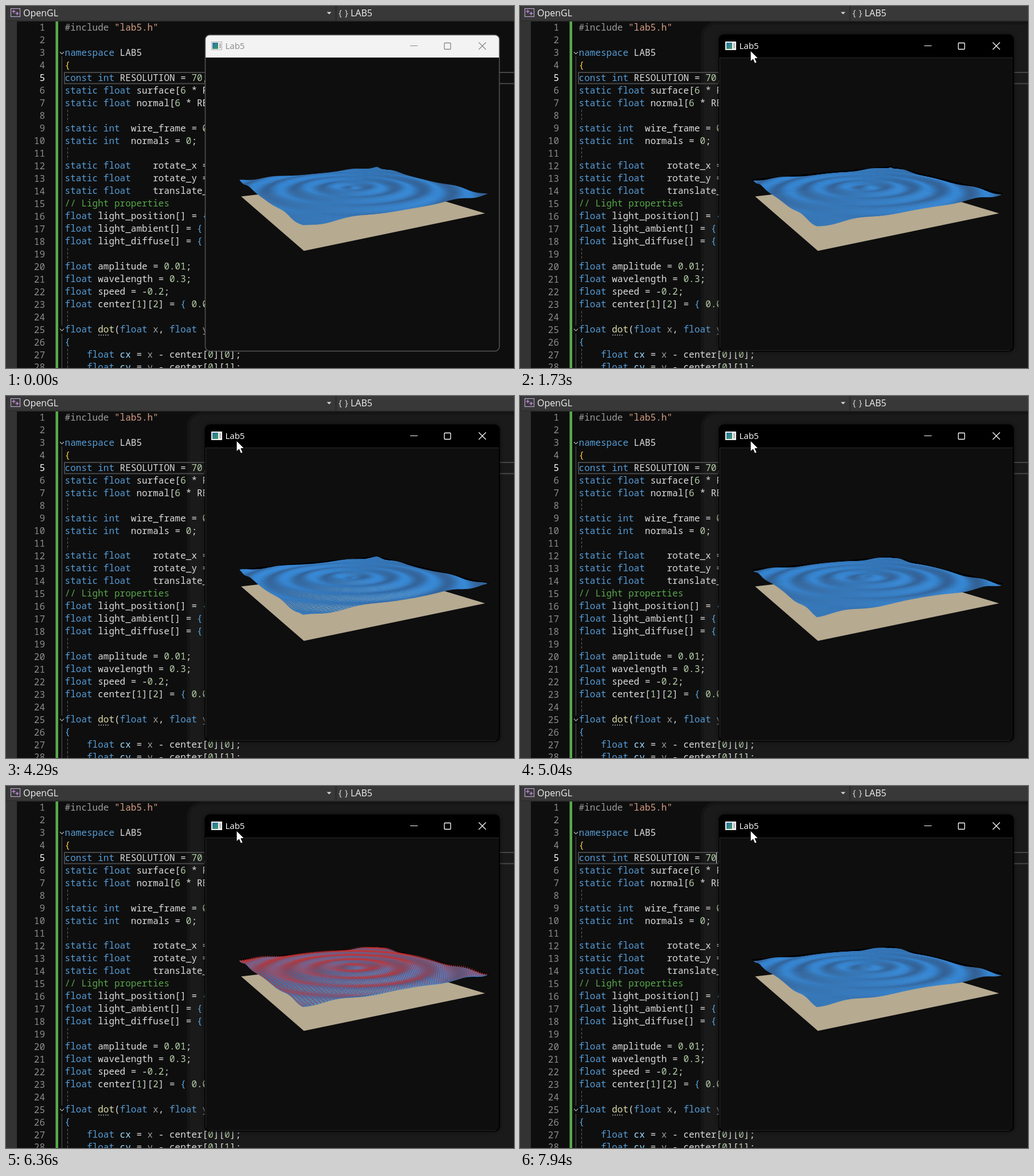
Animation, 886 px wide and 632 px high, one loop 8000 ms. Source, as an HTML page with a canvas:

```html
<!DOCTYPE html>
<html lang="en">
<head>
<meta charset="utf-8">
<title>Water surface</title>
<style>
  html, body { margin: 0; width: 100%; height: 100%; overflow: hidden; background: #0e0e0e; }
  canvas { display: block; }
</style>
</head>
<body>
<canvas id="stage" width="886" height="632"></canvas>
<script>
const ctx = document.getElementById('stage').getContext('2d');
const LOOP = 8000, ACTIVATE = 100;
const MONO = '500 16px "Noto Sans Mono", "DejaVu Sans Mono", monospace';
const UI = '"Open Sans", "Noto Sans", sans-serif';
const CHAR = 9.6, PITCH = 21.97, CODE_X = 102.6;
const lineY = n => 37.3 + (n - 1) * PITCH;

// ---------- drawing helpers ----------
function rect(x, y, w, h, color) {
  ctx.fillStyle = color;
  ctx.fillRect(x, y, w, h);
}
function round(x, y, w, h, r) {
  ctx.beginPath();
  ctx.roundRect(x, y, w, h, r);
}
function path(points, close) {
  ctx.beginPath();
  points.forEach(([x, y]) => ctx.lineTo(x, y));
  if (close) ctx.closePath();
}
function line(points, color, width = 1) {
  path(points);
  ctx.strokeStyle = color;
  ctx.lineWidth = width;
  ctx.stroke();
}
function text(str, x, y, color, font, align = 'left') {
  ctx.font = font;
  ctx.textAlign = align;
  ctx.fillStyle = color;
  ctx.fillText(str, x, y);
}

// ---------- editor ----------
const code = `#include "lab5.h"

namespace LAB5
{
const int RESOLUTION = 70;
static float surface[6 * RES
static float normal[6 * RES

static int  wire_frame = 0;
static int  normals = 0;

static float    rotate_x = 
static float    rotate_y = 
static float    translate_z
// Light properties
float light_position[] = {
float light_ambient[] = {
float light_diffuse[] = {

float amplitude = 0.01;
float wavelength = 0.3;
float speed = -0.2;
float center[1][2] = { 0.0

float dot(float x, float y
{
    float cx = x - center[0][0];
    float cy = y - center[0][1];`.split('\n');

const TOKEN = /(\/\/.*)|("[^"]*")|(#\w+)|\b(namespace|const|int|static|float)\b|\b(\d[\d.]*)|([{}])|\b(c[xy])\b|\b([xy])\b|\b(dot)\b|\w+|\s+|./g;
const TOKEN_COLORS = ['#57a64a', '#d69d85', '#9b9b9b', '#569cd6', '#b5cea8', '#5aa9e6', '#9cdcfe', '#9a9a9a', '#dcdcaa'];

function drawCodeLine(str, n) {
  for (const m of str.matchAll(TOKEN)) {
    const kind = m.slice(1).findIndex(Boolean);
    const color = n === 4 ? '#ffc83d' : TOKEN_COLORS[kind] || '#dcdcdc';
    text(m[0], CODE_X + m.index * CHAR, lineY(n) + 5.5, color, MONO);
  }
}

function drawTopBar() {
  rect(0, 0, 886, 27, '#2e2e2e');
  rect(2, 0, 572, 25, '#383838');
  rect(577, 0, 309, 25, '#383838');
  ctx.strokeStyle = '#b9a3c9';
  ctx.lineWidth = 1.2;
  ctx.strokeRect(8.5, 4.5, 16, 14);
  for (const [x, y] of [[13.5, 9.5], [19.5, 13]]) {
    line([[x - 3, y], [x + 3, y]], '#c68be0', 1.4);
    line([[x, y - 3], [x, y + 3]], '#c68be0', 1.4);
  }
  text('OpenGL', 30, 18, '#f0f0f0', '16px ' + UI);
  text('{', 580, 17, '#e0e0e0', '15px ' + UI);
  text('}', 591, 17, '#e0e0e0', '15px ' + UI);
  text('LAB5', 601, 18, '#f0f0f0', '16px ' + UI);
  path([[559.5, 10.5], [567.5, 10.5], [563.5, 14.5]], true);
  ctx.fillStyle = '#d8d8d8';
  ctx.fill();
}

function drawEditor(active, caret) {
  rect(0, 0, 886, 632, '#0e0e0e');
  if (active) {
    round(318, 30, 600, 640, 24);
    ctx.fillStyle = '#1a1a1a';
    ctx.fill();
    ctx.strokeStyle = '#151515';
    ctx.lineWidth = 5;
    ctx.stroke();
  }
  drawTopBar();
  rect(0, 27, 19, 605, '#333');
  rect(86.5, 27, 4.5, 605, '#58ab4b');
  ctx.strokeStyle = '#464646';
  ctx.lineWidth = 2;
  ctx.strokeRect(102, 116, 800, 19.5);

  line([[97.5, 88], [97.5, 558]], '#555');
  line([[97.5, 572], [97.5, 632]], '#555');
  for (const n of [3, 25]) {
    const y = lineY(n);
    line([[94, y - 1], [97.5, y + 2.5], [101, y - 1]], '#b0b0b0', 1.2);
  }
  ctx.setLineDash([4, 3]);
  for (const n of [8, 11, 19, 24, 27, 28])
    line([[107.5, lineY(n) - 10], [107.5, lineY(n) + 12]], '#666');
  ctx.setLineDash([2, 2]);
  line([[161, 574.5], [179, 574.5]], '#aaa', 1.5);
  ctx.setLineDash([]);

  code.forEach((str, i) => {
    const n = i + 1;
    text(n, 68, lineY(n) + 6, n === 5 ? '#fff' : '#8c8c8c', MONO, 'right');
    drawCodeLine(str, n);
  });
  if (caret) rect(342, 116, 1.2, 19, '#dcdcdc');
}

// ---------- window ----------
function drawWindow(active) {
  ctx.save();
  if (active) {
    ctx.shadowColor = 'rgba(0,0,0,.6)';
    ctx.shadowBlur = 10;
  }
  round(347.5, 50.5, 513, 552, 8);
  ctx.fillStyle = '#0e0e0e';
  ctx.fill();
  ctx.restore();

  ctx.save();
  ctx.clip();
  rect(347, 50, 514, 40, active ? '#000' : '#f3f3f3');
  if (active) rect(347, 90, 514, 1, '#2a2a2a');
  ctx.restore();
  ctx.strokeStyle = active ? '#000' : '#555';
  ctx.lineWidth = active ? 2 : 1.5;
  ctx.stroke();
  if (active) {
    line([[348.5, 90], [348.5, 596]], '#2a2a2a');
    line([[354, 601.5], [854, 601.5]], '#2a2a2a');
  }

  const ink = active ? '#fff' : '#8a8a8a';
  rect(358, 62, 19, 15, active ? '#e8e8e8' : '#b5b5b5');
  rect(359, 63, 17, 13, '#f4f4f4');
  const blend = ctx.createLinearGradient(360, 64, 370, 75);
  blend.addColorStop(0, '#2d6fb0');
  blend.addColorStop(1, '#3c9a62');
  rect(360, 64, 10, 11, blend);
  rect(372, 65, 3, 9, '#b8b8b8');
  text('Lab5', 382.5, 75, ink, '15px ' + UI);
  line([[705, 69.5], [718, 69.5]], ink);
  ctx.lineWidth = 1.3;
  round(764.5, 64.5, 11, 11, 1);
  ctx.stroke();
  line([[824.5, 63.5], [837, 76]], ink, 1.2);
  line([[837, 63.5], [824.5, 76]], ink, 1.2);
}

function drawPointer() {
  path([[402, 78], [402, 97], [406.4, 93], [409.5, 100.2], [413, 98.7], [409.8, 91.7], [415.5, 91.5]], true);
  ctx.fillStyle = '#fff';
  ctx.fill();
  ctx.strokeStyle = '#000';
  ctx.lineWidth = 1;
  ctx.stroke();
}

// ---------- water ----------
const RESOLUTION = 70, AMPLITUDE = 0.01, WAVELENGTH = 0.3, SPEED = -0.2;
const LEVEL = 0.2, PHASE = 0.406, NORMAL_LENGTH = 0.02;
const FREQ = 2 * Math.PI / WAVELENGTH;
const LIGHT = { x: 1, z: 1 };
const FOCAL = 256 / Math.tan(Math.PI / 8);
const YAW = Math.PI / 6, PITCH_ANGLE = Math.PI / 12;
const [cosYaw, sinYaw] = [Math.cos(YAW), Math.sin(YAW)];
const [cosPitch, sinPitch] = [Math.cos(PITCH_ANGLE), Math.sin(PITCH_ANGLE)];

function project(x, y, z) {
  const side = x * cosYaw + z * sinYaw;
  const depth = z * cosYaw - x * sinYaw;
  const up = y * cosPitch - depth * sinPitch;
  const scale = FOCAL / (4 - y * sinPitch - depth * cosPitch);
  return [604 + side * scale, 346 - up * scale];
}
const plane = y => [[-1, -1], [-1, 1], [1, 1], [1, -1]].map(([x, z]) => project(x, y, z));

function waterVertex(x, z, seconds) {
  const r = Math.hypot(x, z) || 1e-6;
  const theta = FREQ * (r + SPEED * seconds) + 2 * Math.PI * PHASE;
  const y = LEVEL + AMPLITUDE * Math.sin(theta);
  const slope = AMPLITUDE * FREQ * Math.cos(theta);
  const facing = -(x * LIGHT.x + z * LIGHT.z) / r;
  const light = Math.min(1, Math.max(0, 0.55 + 1.6 * slope * facing));
  const k = NORMAL_LENGTH / Math.hypot(1, slope);
  return {
    at: project(x, y, z),
    tip: project(x - k * slope * x / r, y + k, z - k * slope * z / r),
    color: `rgb(${52 + 4 * light},${97 + 40 * light},${148 + 66 * light})`
  };
}

function drawWater(t, wire, normals) {
  // Rows and columns run from the far corner to the near one.
  const grid = [];
  for (let j = 0; j <= RESOLUTION; j++) {
    grid.push([]);
    for (let i = 0; i <= RESOLUTION; i++)
      grid[j].push(waterVertex(1 - 2 * i / RESOLUTION, 2 * j / RESOLUTION - 1, t / 1000));
  }
  ctx.lineWidth = wire ? 1.15 : 0.7;
  ctx.lineJoin = 'bevel';
  for (let j = 0; j < RESOLUTION; j++) {
    for (let i = 0; i < RESOLUTION; i++) {
      const a = grid[j][i], b = grid[j][i + 1], c = grid[j + 1][i + 1], d = grid[j + 1][i];
      const corners = [a.at, b.at, c.at, d.at];
      if (wire) corners.push(a.at, c.at);
      path(corners, !wire);
      ctx.fillStyle = ctx.strokeStyle = a.color;
      if (!wire) ctx.fill();
      ctx.stroke();
    }
  }
  if (normals) {
    ctx.beginPath();
    for (const { at, tip } of grid.flat()) {
      ctx.moveTo(...at);
      ctx.lineTo(...tip);
    }
    ctx.strokeStyle = '#c8322f';
    ctx.lineWidth = 0.9;
    ctx.stroke();
  }
  ctx.lineJoin = 'miter';
}

function drawScene(t, active) {
  if (active) {
    path(plane(LEVEL + AMPLITUDE), true);
    ctx.fillStyle = ctx.strokeStyle = '#000';
    ctx.lineWidth = 2;
    ctx.fill();
    ctx.stroke();
  }
  path(plane(0), true);
  ctx.fillStyle = '#b6aa91';
  ctx.fill();
  const wire = (t > 3600 && t < 4900) || (t > 6000 && t < 7000);
  drawWater(t, wire, t > 5200 && t < 7300);
}

function frame() {
  const t = performance.now() % LOOP;
  const active = t >= ACTIVATE;
  const blink = t % 1060;
  drawEditor(active, blink >= 120 && blink < 650);
  drawWindow(active);
  drawScene(t, active);
  if (active) drawPointer();
  requestAnimationFrame(frame);
}
frame();
</script>
</body>
</html>
```
